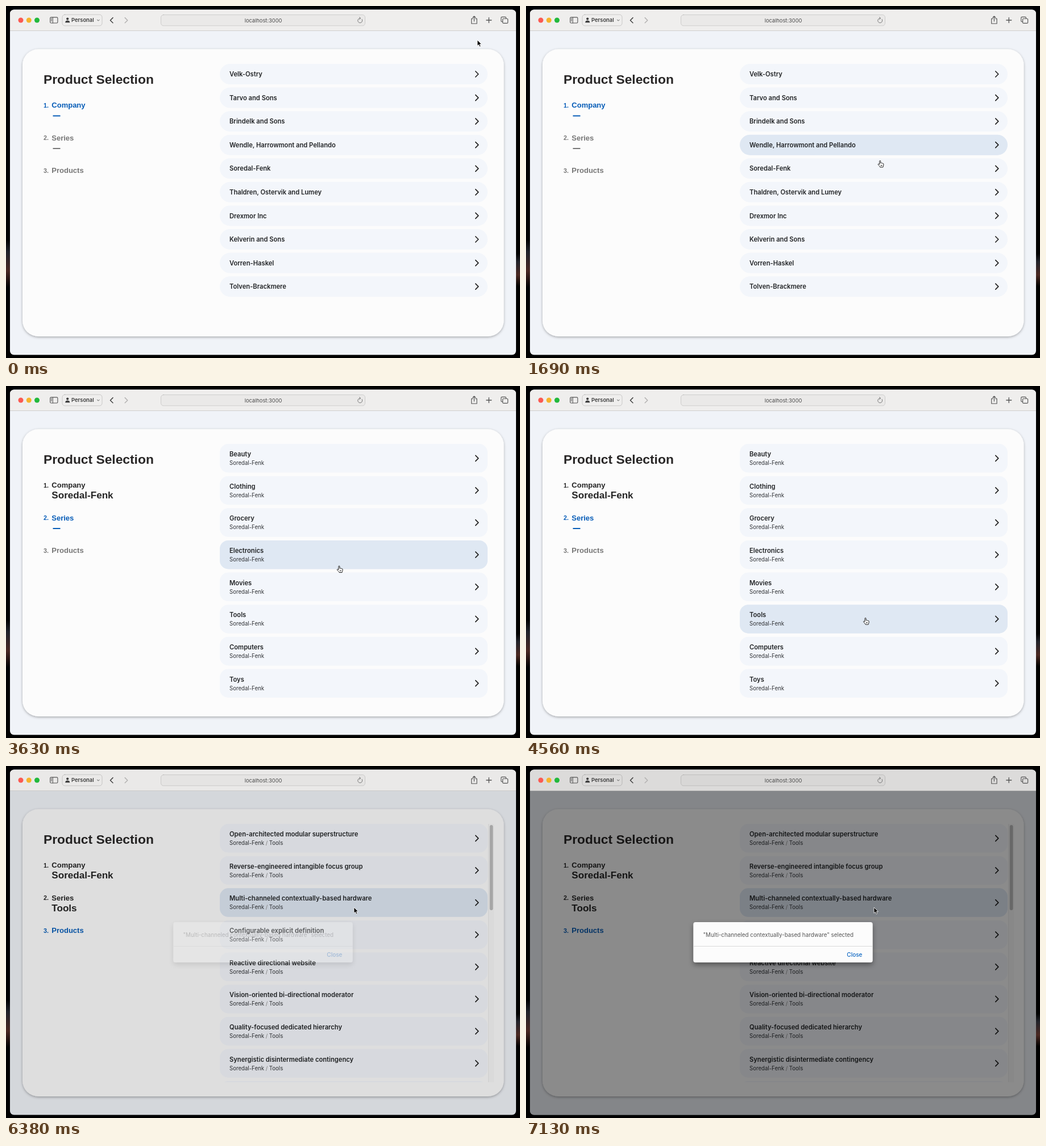
Recreate the animation shown at these times as an HTML page. Size 904 by 620 pixels, loop 7370 ms.

```html
<!DOCTYPE html>
<html lang="en">
<head>
<meta charset="utf-8">
<title>Product Selection</title>
<style>
  html, body { margin: 0; width: 100%; height: 100%; overflow: hidden; background: #000; }
  svg { display: block; width: 904px; height: 620px; }
  text { font-family: Inter, "Open Sans", sans-serif; white-space: pre; }
  .side { font-family: "Liberation Sans", Arial, sans-serif; font-weight: 700; }
  .title { font-size: 11.2px; font-weight: 600; fill: #222426; }
  .sub { font-size: 9.65px; fill: #303236; }
  .icon { fill: none; stroke: #555; stroke-width: 1.15; stroke-linecap: round; stroke-linejoin: round; }
  .chevron { fill: none; stroke: #222; stroke-width: 1.7; stroke-linecap: round; stroke-linejoin: round; }
</style>
</head>
<body>
<svg viewBox="0 0 904 620">
  <defs>
    <linearGradient id="wallpaper" x2="0" y2="1">
      <stop offset="0" stop-color="#000"/>
      <stop offset=".25" stop-color="#22232a"/>
      <stop offset=".65" stop-color="#4a2822"/>
      <stop offset="1" stop-color="#000"/>
    </linearGradient>
    <filter id="cardShadow" x="-5%" y="-5%" width="110%" height="112%">
      <feDropShadow dx="0" dy="1.5" stdDeviation="2.2" flood-opacity=".32"/>
    </filter>
    <filter id="dialogShadow" x="-10%" y="-30%" width="120%" height="180%">
      <feDropShadow dx="0" dy="4" stdDeviation="5" flood-opacity=".4"/>
    </filter>
    <clipPath id="window"><rect x="7" y="6.5" width="890" height="608" rx="7"/></clipPath>
    <clipPath id="list"><rect x="370" y="100" width="495" height="457"/></clipPath>
  </defs>

  <rect width="904" height="620"/>
  <rect y="412" width="7" height="84" fill="url(#wallpaper)"/>
  <rect x="897" y="436" width="7" height="58" fill="url(#wallpaper)"/>

  <g clip-path="url(#window)">
    <rect x="7" y="6" width="890" height="609" fill="#f0f3f8"/>
    <rect x="29" y="76" width="846.5" height="506" rx="28" fill="#fcfcfc" filter="url(#cardShadow)"/>
    <text class="side" x="66" y="137.3" font-size="22.8" fill="#282626">Product Selection</text>
    <g id="screens"></g>
    <rect id="backdrop" x="7" y="44" width="890" height="571"/>

    <rect x="7" y="6" width="890" height="38" fill="#efeeed"/>
    <rect id="barTint" x="7" y="6" width="890" height="38"/>
    <path d="M7 43.5H897" stroke="#000" stroke-opacity=".13"/>
    <circle cx="26" cy="25" r="4.5" fill="#fb5a52"/>
    <circle cx="40.3" cy="25" r="4.5" fill="#f6b42c"/>
    <circle cx="54.5" cy="25" r="4.5" fill="#22b93c"/>
    <g class="icon">
      <rect x="77.7" y="19.8" width="13.2" height="10.2" rx="1.8"/>
      <path d="M82.3 20V30M79.4 22.2H80.7M79.4 24.2H80.7M79.4 26.2H80.7" stroke-width="1"/>
      <rect x="99" y="15.2" width="70" height="19.6" rx="4.5" stroke="#000" stroke-opacity=".16" stroke-width="1"/>
      <path d="M160.4 24.2L162.3 26.1L164.2 24.2" stroke-width="1"/>
      <path d="M188 20.6L183.4 25.2L188 29.8" stroke="#444" stroke-width="1.5"/>
      <path d="M209.2 20.6L213.8 25.2L209.2 29.8" stroke="#b4b3b2" stroke-width="1.5"/>
      <rect x="272.5" y="15.5" width="359" height="19.3" rx="4.5" fill="#000" fill-opacity=".018" stroke="#000" stroke-opacity=".13" stroke-width="1"/>
      <path d="M626.2 23.6A4 4 0 1 1 622.8 21.6M621.6 19.7L623.8 21.6L621.6 23.6" stroke="#777" stroke-width="1"/>
      <path d="M821 22.4H818.7V31H828.1V22.4H825.8M823.4 27V18.2M820.8 20.5L823.4 18L826 20.5"/>
      <path d="M844.8 25H853.8M849.3 20.5V29.5" stroke-width="1.3"/>
      <path d="M873.4 27.7H872.2Q870.8 27.7 870.8 26.3V20.8Q870.8 19.4 872.2 19.4H878Q879.4 19.4 879.4 20.8V22"/>
      <rect x="873.6" y="22.2" width="9" height="8.2" rx="1.5"/>
    </g>
    <g fill="#3c3c3c">
      <circle cx="108.2" cy="22.6" r="2.1"/>
      <path d="M104.2 29.2Q104.2 25.6 108.2 25.6T112.2 29.2Z"/>
      <text x="115" y="28.3" font-size="9.4" font-weight="600">Personal</text>
    </g>
    <text x="452.5" y="28.6" font-size="9.3" fill="#4a4a4a" text-anchor="middle">localhost:3000</text>

    <g id="dialog">
      <rect x="294.3" y="275" width="315.4" height="71" rx="4" fill="#fcfcfc" filter="url(#dialogShadow)"/>
      <path d="M294.3 317.5H609.7" stroke="#d8d8d8"/>
      <text x="311.5" y="300.7" font-size="9.8" fill="#555">"Multi-channeled contextually-based hardware" selected</text>
      <text x="564.3" y="335.7" font-size="10" font-weight="500" fill="#0c66c2">Close</text>
    </g>
  </g>

  <path id="arrow" d="M0 0V10.2L2.4 8L4 11.7L5.8 10.9L4.2 7.3H7.4Z" fill="#000" stroke="#fff" stroke-width=".8"/>
  <path id="hand" fill="#fff" stroke="#111" stroke-width=".95" stroke-linejoin="round"
    d="M-1 6.8V1A1 1 0 0 1 1 1V4.4C1.3 3.8 2.6 3.9 2.8 4.6C3.2 4.1 4.3 4.3 4.5 5C5 4.6 6 4.9 6.1 5.8V8C6.1 9.4 5.2 10 5.1 11.6H.1C-.2 10-2.2 8.8-3.4 7C-3.9 6.1-2.8 5.3-2 6ZM1.6 7.6V9.4M3.2 7.6V9.4"/>
</svg>

<script>
const LOOP = 7370, FRAME = 62.5, LAST_FRAME = 114;
const COMPANY = 'Soredal-Fenk', SERIES = 'Tools';
const BLUE = '#075db8', GRAY = '#777', DARK = '#252525';
const DIALOG_AT = 6300, DIALOG_FADE = 225, HOVER_FADE = 120;

const screens = [
  { start: 0, height: 36, step: 41.57, radius: 18, rows: [
    'Velk-Ostry', 'Tarvo and Sons', 'Brindelk and Sons', 'Wendle, Harrowmont and Pellando', COMPANY,
    'Thaldren, Ostervik and Lumey', 'Drexmor Inc', 'Kelverin and Sons', 'Vorren-Haskel', 'Tolven-Brackmere'] },
  { start: 3000, height: 50.6, step: 56.63, radius: 15, sub: COMPANY, rows: [
    'Beauty', 'Clothing', 'Grocery', 'Electronics', 'Movies', SERIES, 'Computers', 'Toys'] },
  { start: 5000, height: 50.6, step: 56.63, radius: 15, scroll: true,
    sub: `${COMPANY} <tspan fill="#888">/</tspan> ${SERIES}`, rows: [
    'Open-architected modular superstructure', 'Reverse-engineered intangible focus group',
    'Multi-channeled contextually-based hardware', 'Configurable explicit definition',
    'Reactive directional website', 'Vision-oriented bi-directional moderator',
    'Quality-focused dedicated hierarchy', 'Synergistic disintermediate contingency', ''] }
];

// Time, x, y of the pointer tip
const path = [
  [0, 829, 60], [300, 829, 60], [1130, 684.5, 240], [1450, 640, 262], [2000, 600, 286],
  [2560, 583.5, 297], [3500, 583.5, 297], [4200, 597, 408.5], [5350, 597, 408.5],
  [5750, 606, 312.5], [6060, 612, 249], [LOOP, 612, 249]
];

// Time at which a row of a screen becomes highlighted
const hovers = [
  [1250, 0, 3], [1900, 0, 4], [3060, 1, 3], [3750, 1, 4], [4000, 1, 5],
  [5000, 2, 5], [5600, 2, 4], [5830, 2, 3], [6060, 2, 2], [LOOP, -1, -1]
];

const $ = id => document.getElementById(id);
const clamp = v => Math.max(0, Math.min(1, v));
const smooth = v => v * v * (3 - 2 * v);

function stepsMarkup(active) {
  const values = [COMPANY, SERIES];
  return ['Company', 'Series', 'Products'].map((label, i) => {
    const y = 179.3 + i * 57.4;
    const color = i < active ? DARK : i === active ? BLUE : GRAY;
    const detail = i === 2 ? '' : i < active
      ? `<text class="side" x="80.3" y="${y + 19}" font-size="17.1" fill="${DARK}">${values[i]}</text>`
      : `<path d="M82.5 ${y + 14.2}h13" stroke="${color}" stroke-width="2"/>`;
    return `<g fill="${color}"><text class="side" x="66" y="${y - .3}" font-size="10.8">${i + 1}.</text>
      <text class="side" x="80.3" y="${y}" font-size="13">${label}</text></g>${detail}`;
  }).join('');
}

function rowMarkup(screen, title, i) {
  const y = 102 + i * screen.step, mid = y + screen.height / 2;
  const box = `x="376" y="${y}" width="471" height="${screen.height}" rx="${screen.radius}"`;
  const sub = screen.sub && title ? `<text class="sub" x="393" y="${y + 37.1}">${screen.sub}</text>` : '';
  return `<rect ${box} fill="#f3f6fb"/><rect ${box} fill="#dfe8f3" class="hover" opacity="0"/>
    <text class="title" x="393" y="${y + 22.1}">${title}</text>${sub}
    <path class="chevron" d="M825.8 ${mid - 5}l5 5l-5 5"/>`;
}

const scrollbar = `<rect x="848" y="102" width="10.5" height="455" fill="#f7f7f7"/>
  <path d="M848.5 102V557" stroke="#ebebeb"/>
  <rect x="850.7" y="104" width="5.8" height="150" rx="2.9" fill="#bcbcbc"/>`;

$('screens').innerHTML = screens.map((screen, i) => `<g>${stepsMarkup(i)}
  <g clip-path="url(#list)">${screen.rows.map((title, k) => rowMarkup(screen, title, k)).join('')}
  ${screen.scroll ? scrollbar : ''}</g></g>`).join('');

const groups = [...$('screens').children];
const highlights = groups.map(group => [...group.querySelectorAll('.hover')]);

function pointerAt(t) {
  const i = path.findIndex((p, k) => k && t <= p[0]);
  const [t0, x0, y0] = path[i - 1], [t1, x1, y1] = path[i];
  const u = (t - t0) / (t1 - t0);
  return [x0 + (x1 - x0) * u, y0 + (y1 - y0) * u];
}

function render(t) {
  groups.forEach((group, i) => {
    const end = i < 2 ? screens[i + 1].start : LOOP;
    group.style.display = t >= screens[i].start && t < end ? '' : 'none';
  });

  highlights.flat().forEach(el => el.setAttribute('opacity', 0));
  hovers.slice(0, -1).forEach(([start, screen, row], i) => {
    const shown = clamp((t - start) / HOVER_FADE) - clamp((t - hovers[i + 1][0]) / HOVER_FADE);
    highlights[screen][row].setAttribute('opacity', shown);
  });

  const fade = smooth(clamp((t - DIALOG_AT) / DIALOG_FADE));
  $('backdrop').setAttribute('opacity', fade * .45);
  $('barTint').setAttribute('opacity', fade * .08);
  $('dialog').setAttribute('opacity', fade);

  const [x, y] = pointerAt(t);
  const overRow = y >= 102 && fade === 0;
  for (const [id, visible] of [['hand', overRow], ['arrow', !overRow]]) {
    $(id).style.display = visible ? '' : 'none';
    $(id).setAttribute('transform', `translate(${x} ${y})`);
  }
}

const began = performance.now();
function tick() {
  const t = (performance.now() - began) % LOOP;
  render(Math.min(LAST_FRAME, Math.floor((t + 5) / FRAME)) * FRAME);
  requestAnimationFrame(tick);
}
tick();
</script>
</body>
</html>
```
